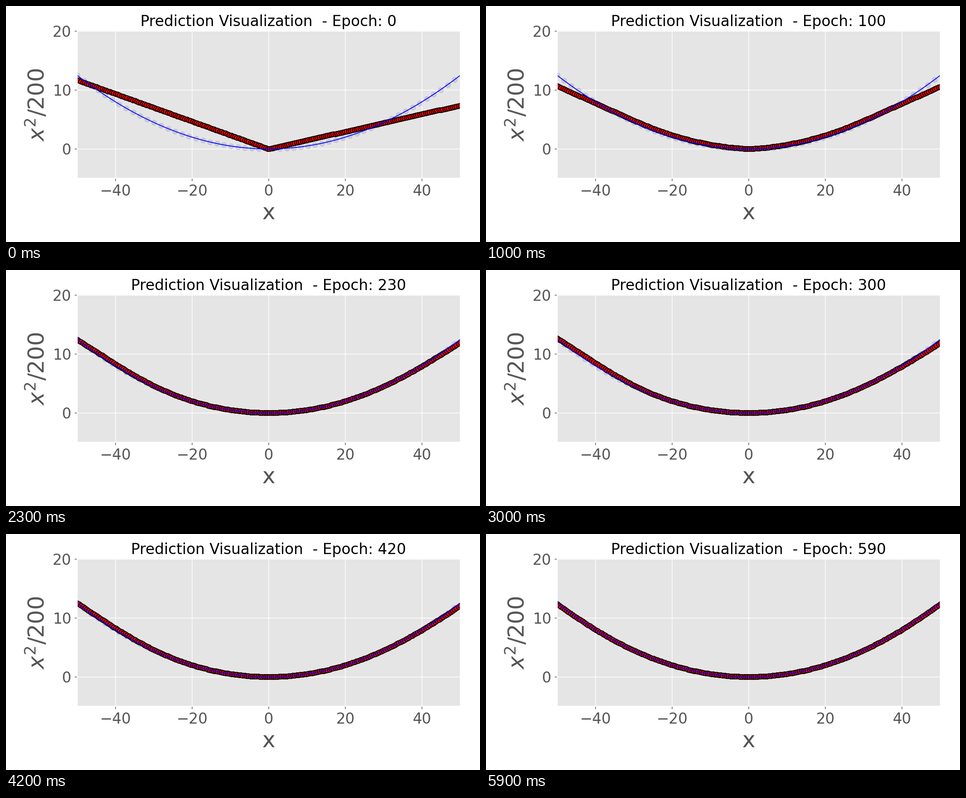
Animation of 1058 by 529 pixels, one loop 6 s. Source, as a matplotlib script:

```python
import numpy as np
import matplotlib.pyplot as plt
from matplotlib.animation import FuncAnimation

W, H, DPI = 1058, 529, 132.25
FRAMES, INTERVAL = 60, 100
GREY = "#555555"

plt.rcParams.update({
    "font.family": "DejaVu Sans",
    "axes.facecolor": "#E5E5E5",
    "axes.edgecolor": "white",
    "axes.linewidth": 1,
    "axes.labelcolor": GREY,
    "axes.axisbelow": True,
    "axes.grid": True,
    "grid.color": "white",
    "grid.linewidth": 0.8,
    "xtick.color": GREY,
    "ytick.color": GREY,
})


def target(x):
    return x ** 2 / 200


def bump(v, center, width):
    return np.exp(-((v - center) / width) ** 2)


def clipped_parabola(x, k):
    """Parabola up to |x| = k, then its tangent, drawn in short facets."""
    joints = np.linspace(-50, 50, 21)
    r = np.abs(joints)
    y = np.where(r < k, target(r), k * (2 * r - k) / 200)
    return np.interp(x, joints, y)


def predict(x, step):
    # The untrained V gives way to a parabola that widens from the middle.
    vee = np.where(x < 0, -0.234 * x, (0.148 + 0.008 * step) * x)
    weight = bump(step, 0, 7)
    fit = clipped_parabola(x, min(45, 20 + step))

    # Early undershoot right of zero, later drift at both ends.
    reach = np.where(x < 1, 8, 30)
    dip = 0.85 * np.exp(-np.abs(x - 1) / reach) * bump(step, 5, 2)
    drift = 0.5 * (bump(x, -42, 12) - bump(x, 52, 10)) * bump(step, 32, 13)
    return weight * vee + (1 - weight) * fit - dip + drift


fig = plt.figure(figsize=(W / DPI, H / DPI), dpi=DPI, facecolor="white")
left, right, top, bottom = 158.7, 1014, 56.3, 386.4
ax = fig.add_axes([left / W, 1 - bottom / H,
                   (right - left) / W, (bottom - top) / H])
ax.set(xlim=(-50, 50), ylim=(-5, 20),
       xticks=range(-40, 41, 20), yticks=[0, 10, 20])
ax.tick_params(labelsize=18)
ax.set_xlabel("x", fontsize=27)
ax.set_ylabel("$x^2/200$", fontsize=27)
title = ax.set_title("", fontsize=18)

samples = -50 + 1.824 * np.arange(55)
ax.scatter(samples, target(samples), c="blue", edgecolors="black", alpha=0.1)

x = np.linspace(-50, 50, 200)
dots = ax.scatter(x, predict(x, 0), c="red", edgecolors="black")
ax.plot(x, target(x), color="blue", lw=1)


def update(step):
    dots.set_offsets(np.column_stack([x, predict(x, step)]))
    title.set_text(f"Prediction Visualization  - Epoch: {step * 10}")
    return dots, title


anim = FuncAnimation(fig, update, frames=FRAMES, interval=INTERVAL,
                     repeat=True, repeat_delay=0)
plt.show()
```
